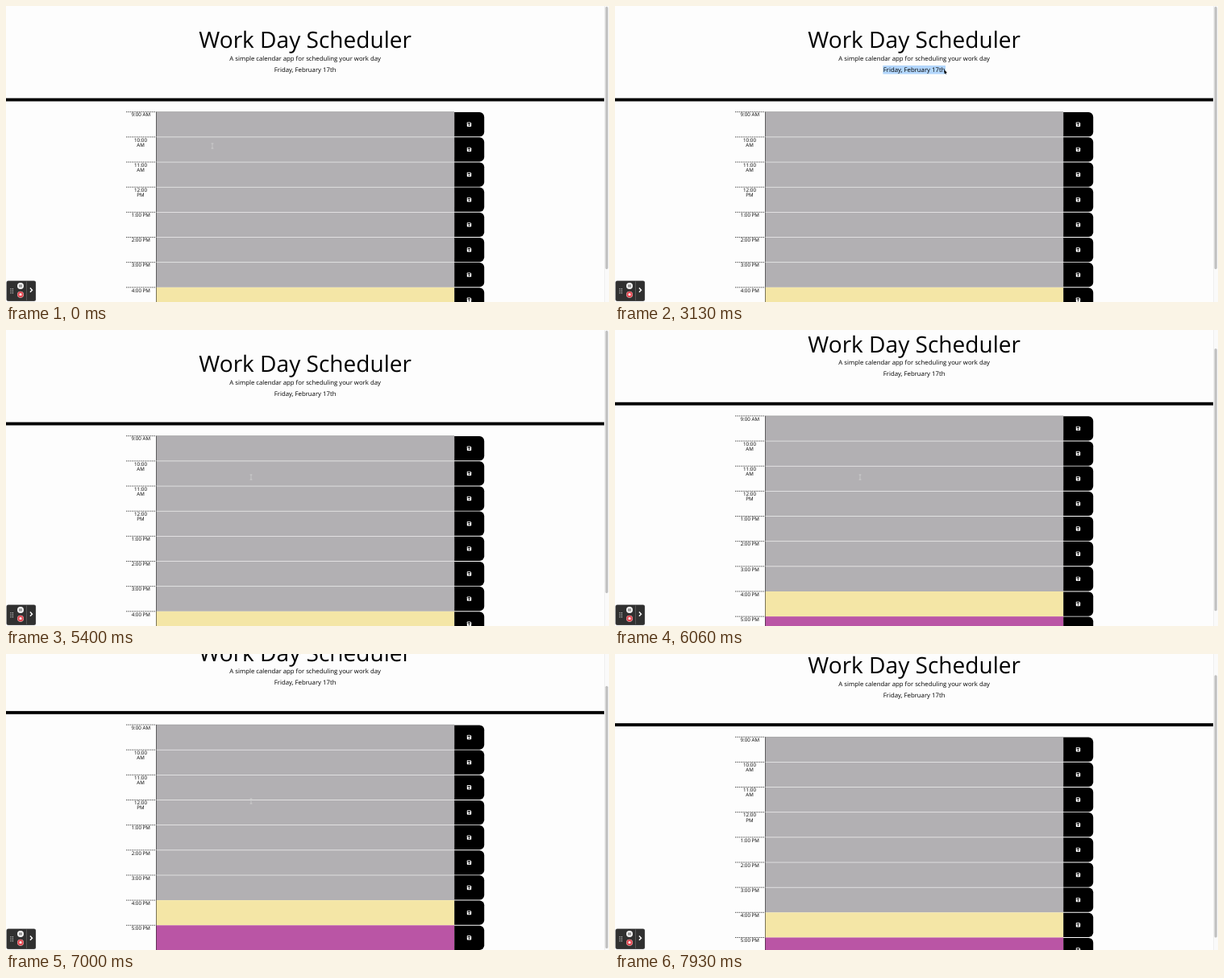
An HTML page with a canvas for the animation above (8 s loop, 748x368 px).

```html
<!DOCTYPE html>
<html lang="en">
<head>
<meta charset="utf-8">
<title>Work Day Scheduler</title>
<style>
  html, body { margin: 0; width: 100%; height: 100%; overflow: hidden; background: #fdfdfd; }
  canvas { display: block; }
</style>
</head>
<body>
<canvas id="stage" width="748" height="368"></canvas>
<script>
const ctx = document.getElementById('stage').getContext('2d');
const LOOP = 8000, STEP = 1000 / 15;
const PAGE = 742, CENTER = 371.1;
const LEFT = 149.1, COL = 37.01, TOP = 131.7, ROW = 31.16;
const ROWS = 9, PRESENT = 7;
const MAX_SCROLL = 43.7;
const DATE_LEFT = 332.3, DATE_RIGHT = 410;

const lerp = (a, b, p) => a + (b - a) * p;
const progress = (t, start, end) => Math.min(1, Math.max(0, (t - start) / (end - start)));
const easeOut = (p, power) => 1 - (1 - p) ** power;
const easeInOut = p => p * p * (3 - 2 * p);

function rect(x, y, w, h, color) {
  ctx.fillStyle = color;
  ctx.fillRect(x, y, w, h);
}

function round(x, y, w, h, r, color) {
  ctx.fillStyle = color;
  ctx.beginPath();
  ctx.roundRect(x, y, w, h, r);
  ctx.fill();
}

function disc(x, y, r, color) {
  ctx.fillStyle = color;
  ctx.beginPath();
  ctx.arc(x, y, r, 0, Math.PI * 2);
  ctx.fill();
}

function line(points, color, width, dash = []) {
  ctx.strokeStyle = color;
  ctx.lineWidth = width;
  ctx.setLineDash(dash);
  ctx.beginPath();
  points.forEach(([x, y]) => ctx.lineTo(x, y));
  ctx.stroke();
}

function text(str, x, y, size) {
  ctx.font = `${size}px "Open Sans", sans-serif`;
  ctx.textAlign = 'center';
  ctx.fillStyle = '#000';
  ctx.fillText(str, x, y);
}

function header(selectionEnd) {
  text('Work Day Scheduler', CENTER, 52.4, 28.05);
  text('A simple calendar app for scheduling your work day', CENTER, 68.2, 7.79);
  rect(DATE_LEFT, 74, selectionEnd - DATE_LEFT, 10.6, '#b2d6fc');
  text('Friday, February 17th', CENTER, 82.2, 7.79);
  rect(0, 114.6, PAGE, 3.9, '#000');
}

function saveIcon(x, y) {
  round(x - 2.7, y - 2.7, 5.4, 5.4, [0.7, 1.6, 0.7, 0.7], '#fff');
  rect(x - 1.8, y - 1.9, 3.2, 1.4, '#000');
  disc(x, y + 1, 0.85, '#000');
}

function hourLabel(i) {
  const hour = 9 + i;
  return `${(hour - 1) % 12 + 1}:00 ${hour < 12 ? 'AM' : 'PM'}`;
}

function hourRow(i) {
  const y = TOP + i * ROW, areaX = LEFT + COL, buttonX = areaX + COL * 10;
  const color = i < PRESENT ? '#b2b0b3' : i === PRESENT ? '#f4e6a6' : '#ba55a5';
  rect(areaX, y, COL * 10, ROW, color);
  if (i < PRESENT) rect(areaX, y - 0.3, COL * 10, 0.7, i ? '#eee' : '#999');
  rect(areaX, y, 0.5, ROW, '#000');
  line([[LEFT, y], [areaX, y]], '#222', 0.9, [1.2, 1.1]);

  round(buttonX, y + 0.4, COL, ROW - 0.9, [0, 5.8, 5.8, 0], '#000');
  saveIcon(buttonX + COL / 2 - 0.2, y + 15.5);

  const label = hourLabel(i);
  const lines = label.length > 7 ? label.split(' ') : [label];
  lines.forEach((part, n) => text(part, LEFT + COL / 2 - 0.3 * lines.length, y + 5.7 + n * 6.23, 6.23));
}

function scrollbar(scroll) {
  rect(PAGE, 0, 6, 368, '#fafafa');
  rect(PAGE, 0, 0.5, 368, '#e6e6e6');
  round(743.5, 0.8 + scroll * 0.89, 3.3, 326.4, 1.6, '#c1c1c1');
}

function recorder() {
  round(0.5, 341.5, 36.6, 25.6, 2.5, '#5a5a5a');
  round(1, 342, 35.6, 24.6, 2, '#303030');
  for (let i = 0; i < 6; i++) disc(6 + (i % 2) * 2.4, 351.8 + (i >> 1) * 2.5, 0.7, '#ccc');
  disc(18, 348, 4, '#f2f2f2');
  rect(16.5, 346.4, 1, 3.2, '#444');
  rect(18.5, 346.4, 1, 3.2, '#444');
  disc(18, 358.7, 4, '#ecc9cb');
  disc(18, 358.7, 3.6, '#e0454f');
  round(16.6, 357.3, 2.8, 2.8, 0.5, '#fff');
  rect(25, 342.5, 0.7, 23.5, '#666');
  line([[29.9, 350.6], [32.5, 353.2], [29.9, 355.8]], '#fff', 1.4);
}

function beam(x, y) {
  line([[x, y - 3], [x, y + 3]], '#ccc', 0.8);
  for (const end of [-3, 3]) line([[x - 1.4, y + end], [x + 1.4, y + end]], '#d4d4d4', 0.8);
}

function arrow(x, y) {
  ctx.fillStyle = '#000';
  ctx.beginPath();
  ctx.moveTo(x, y);
  ctx.lineTo(x, y + 4.8);
  ctx.lineTo(x + 3.3, y + 3.4);
  ctx.fill();
  line([[x + 0.8, y + 2.5], [x + 2.1, y + 5.3]], '#000', 0.9);
}

function ring(x, y) {
  ctx.strokeStyle = '#dc7f87';
  ctx.lineWidth = 1.8;
  ctx.setLineDash([]);
  ctx.beginPath();
  ctx.arc(x, y, 12.3, 0, Math.PI * 2);
  ctx.stroke();
}

function scrollAt(t) {
  const down = easeOut(progress(t, 5930, 6490), 3);
  return MAX_SCROLL * down - 15.2 * progress(t, 7800, 7933);
}

const dragAt = t => lerp(332, 411, easeOut(progress(t, 1400, 2480), 2));

function pointerAt(t) {
  if (t < 2860) {
    const p = easeInOut(progress(t, 67, 930));
    return [lerp(256, 331, p), lerp(174, 78, p) - 85 * Math.sin(Math.PI * p)];
  }
  if (t < 4400) {
    const p = easeInOut(progress(t, 3070, 3930));
    return [lerp(409, 379, p), lerp(79, 103.5, p)];
  }
  const leave = easeInOut(progress(t, 4400, 4730));
  const enter = easeInOut(progress(t, 4800, 5060));
  const settle = progress(t, 5200, 5400);
  return [379 - 85 * leave + 10 * enter, 103.5 + 13.5 * leave + 41 * enter + 25 * settle];
}

function draw(t) {
  const scroll = scrollAt(t), dragX = dragAt(t), [x, y] = pointerAt(t);
  const selected = t >= 1400 && t < 4330;
  rect(0, 0, 748, 368, '#fdfdfd');
  ctx.save();
  ctx.translate(0, -scroll);
  header(selected ? Math.max(DATE_LEFT, Math.min(dragX, DATE_RIGHT)) : DATE_LEFT);
  for (let i = 0; i < ROWS; i++) hourRow(i);
  ctx.restore();
  scrollbar(scroll);
  recorder();
  if (t < 7390) (y > TOP ? beam : arrow)(x, y);
  if (t >= 1400 && t < 2860) ring(dragX, 79);
  if (t >= 4060 && t < 4400) ring(379, 103.7);
}

function frame(now) {
  const t = now % LOOP;
  draw(Math.floor((t + 6.9) / STEP) * STEP);
  requestAnimationFrame(frame);
}

ctx.textRendering = 'geometricPrecision';
requestAnimationFrame(frame);
</script>
</body>
</html>
```
